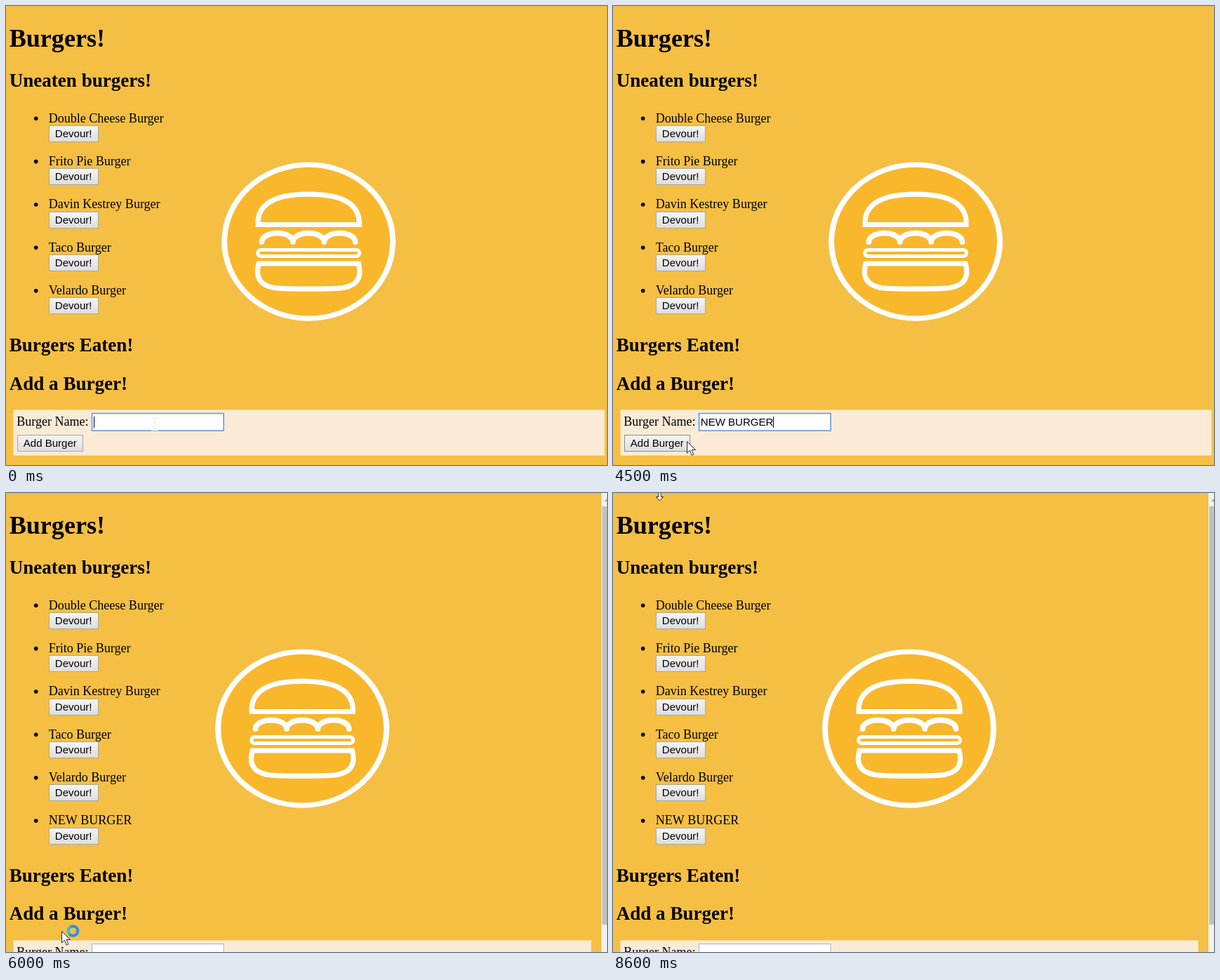
Recreate the animation shown at these times as an HTML page with a canvas. Size 856 by 654 pixels, loop 9100 ms.

```html
<!DOCTYPE html>
<html lang="en">
<head>
<meta charset="utf-8">
<title>Burgers</title>
<style>
html, body { margin: 0; width: 100%; height: 100%; overflow: hidden; background: #f5bf43; }
canvas { display: block; }
</style>
</head>
<body>
<canvas id="stage" width="856" height="654"></canvas>
<script>
const ctx = document.getElementById('stage').getContext('2d', { alpha: false });
const LOOP = 9100, PITCH = 61.35, RELOAD = 5600;
const BODY = 18.05, H1 = BODY * 2, H2 = BODY * 1.5, CONTROL = 15.04;
const SERIF = '"Liberation Serif", "Times New Roman", serif';
const SANS = '"Liberation Sans", Arial, sans-serif';
const BURGERS = ['Double Cheese Burger', 'Frito Pie Burger', 'Davin Kestrey Burger',
  'Taco Burger', 'Velardo Burger', 'NEW BURGER'];

// [time, characters typed]
const TYPING = [[0, 0], [600, 1], [900, 2], [1200, 3], [2000, 4], [2400, 5],
  [2600, 6], [2800, 7], [3000, 8], [3200, 9], [3400, 10]];
const CARET = [[0, 1], [100, 0], [600, 1], [1700, 0], [2000, 1], [3900, 0], [4400, 1], [4800, 0]];
const STATUS = [[0, 0], [5300, 0.5], [5400, 1], [5900, 0.5], [6000, 0]];
// [time, cursor kind, x, y]
const POINTER = [[0, 'beam', 211.5, 596], [4200, 'beam', 198.5, 596],
  [4400, 'arrow', 130, 612], [4500, 'arrow', 105, 620], [4600, 'arrow', 86, 624],
  [4700, 'arrow', 79, 624], [5400, 'busy', 79, 624],
  [6900, 'beam', 81, 611], [7000, 'beam', 84, 576], [7100, 'arrow', 90, 524],
  [7200, 'arrow', 101, 480], [7300, 'arrow', 117, 423],
  [7500, 'arrow', 130, 408], [7600, 'arrow', 140, 393],
  [7800, 'arrow', 132, 290], [7900, 'arrow', 122, 198],
  [8100, 'arrow', 116, 180], [8200, 'beam', 107, 156], [8300, 'beam', 96, 112],
  [8400, 'arrow', 83, 72], [8500, 'arrow', 73, 26], [8600, 'resize', 66.5, 2]];

const at = (keys, t) => keys.filter(k => k[0] <= t).pop();

function rect(x, y, w, h, color) {
  ctx.fillStyle = color;
  ctx.fillRect(x, y, w, h);
}

function text(str, x, y, size, family = SERIF, weight = '', color = '#000') {
  ctx.font = `${weight} ${size}px ${family}`;
  ctx.fillStyle = color;
  ctx.fillText(str, x, y);
}

function ellipse(x, y, rx, ry, color) {
  ctx.beginPath();
  ctx.ellipse(x, y, rx, ry, 0, 0, 7);
  ctx.fillStyle = color;
  ctx.fill();
}

function shape(path, fill, stroke, width) {
  const p = new Path2D(path);
  if (fill) { ctx.fillStyle = fill; ctx.fill(p); }
  if (stroke) { ctx.strokeStyle = stroke; ctx.lineWidth = width; ctx.stroke(p); }
}

function button(label, x, y, w, mouse, pressed) {
  const h = 24;
  const hover = mouse[1] !== 'beam' && mouse[2] >= x && mouse[2] <= x + w &&
    mouse[3] >= y && mouse[3] <= y + h;
  const g = ctx.createLinearGradient(0, y, 0, y + h);
  g.addColorStop(0, pressed ? '#e2e2e2' : '#f5f5f5');
  g.addColorStop(0.35, pressed ? '#e2e2e2' : '#ededed');
  g.addColorStop(1, pressed ? '#cfcfcf' : '#dddddd');
  rect(x, y, w, h, g);
  ctx.strokeStyle = hover ? '#8c8c8c' : '#a9a69f';
  ctx.lineWidth = 1;
  ctx.strokeRect(x + 0.5, y + 0.5, w - 1, h - 1);
  text(label, x + 8.8, y + 16.5, CONTROL, SANS);
}

function icon(dx) {
  ctx.save();
  ctx.translate(dx, 0);
  ellipse(431, 335.6, 124, 113.2, '#fff');
  ellipse(431, 335.6, 116, 105.9, '#f9b72b');
  shape('M359 311.5V306C361 282 382 268.2 431 268.2S501 282 503 306V311.5Z', null, '#fff', 7.2);
  ctx.lineCap = ctx.lineJoin = 'round';
  shape('M364.3 336a22.2 12.4 0 0 1 44.4 0a22.2 12.4 0 0 1 44.4 0a22.2 12.4 0 0 1 44.4 0',
    null, '#fff', 7.8);
  shape('M363 347.5H499a4.5 4.5 0 0 1 0 9H363a4.5 4.5 0 0 1 0-9Z', null, '#fff', 5);
  ctx.lineJoin = 'miter';
  shape('M360 367H502C508 389 499 402.6 465 402.6C442 403.3 420 403.3 397 402.6C363 402.6 354 389 360 367Z',
    null, '#fff', 7.2);
  ctx.restore();
}

function form(dy, right, value, focused, caret, mouse, pressed) {
  rect(10.5, 575.4 + dy, right - 10.5, 65.1, '#faebd7');
  text('Burger Name:', 15.3, 597.5 + dy, BODY);
  rect(122, 580 + dy, 188, 25, '#fff');
  ctx.strokeStyle = focused ? '#5b93e6' : '#b3b0aa';
  ctx.lineWidth = focused ? 1.5 : 1;
  ctx.strokeRect(122.5, 580.5 + dy, 187.5, 24.5);
  text(value, 124.8, 598 + dy, CONTROL, SANS);
  if (caret) rect(Math.round(124.8 + ctx.measureText(value).width), 585, 1, 16, '#000');
  button('Add Burger', 16, 611 + dy, 94, mouse, pressed);
}

function scrollbar() {
  rect(848, 0, 8, 654, '#f1f1f1');
  rect(849, 19, 7, 596, '#c1c1c1');
  shape('M852 12L857 7L862 12Z', '#a3a3a3');
}

function statusBar(alpha) {
  ctx.save();
  ctx.globalAlpha = alpha;
  shape('M0 645H280.5Q284 645 284 648.5V654H0Z', '#000');
  text('Waiting for quiet-meadow-97290 to reply...', 3, 662, 13, SANS, '', '#808080');
  ctx.restore();
}

function pointer([, kind, x, y]) {
  ctx.save();
  ctx.translate(x, y);
  if (kind === 'beam') {
    shape('M-5 -8.5H-1.5L0 -7.5L1.5 -8.5H5M0 -7.5V7.5M-5 8.5H-1.5L0 7.5L1.5 8.5H5',
      null, '#f7f0e4', 1.6);
  } else if (kind === 'resize') {
    shape('M-1.7 -6V3.5H-5L0 9L5 3.5H1.7V-6Z', '#fff', '#222', 1);
  } else {
    if (kind === 'busy') {
      ctx.beginPath();
      ctx.arc(16.5, 0, 6.8, 0, 7);
      ctx.strokeStyle = '#2f8fe0';
      ctx.lineWidth = 4;
      ctx.stroke();
      ctx.beginPath();
      ctx.arc(16.5, 0, 6.8, 2.4, 4.2);
      ctx.strokeStyle = '#45b4f0';
      ctx.stroke();
    }
    shape('M.5 .5V17L4.3 13.3L7.2 20L9.8 18.9L7 12.4H12.4Z', '#fff', '#222', 1);
  }
  ctx.restore();
}

function draw(t) {
  const reloaded = t >= RELOAD;
  const count = reloaded ? 6 : 5;
  const dy = reloaded ? PITCH : 0;
  const mouse = at(POINTER, t);

  rect(0, 0, 856, 654, '#f5bf43');
  icon(reloaded ? -9 : 0);
  text('Burgers!', 4.7, 57.7, H1, SERIF, 'bold');
  text('Uneaten burgers!', 4.7, 114.6, H2, SERIF, 'bold');

  for (let i = 0; i < count; i++) {
    const y = i * PITCH;
    ellipse(42.7, 160.3 + y, 2.8, 2.8, '#000');
    text(BURGERS[i], 60.7, 165.7 + y, BODY);
    button('Devour!', 61, Math.round(170 + y), 71, mouse);
  }

  text('Burgers Eaten!', 4.7, 492.2 + dy, H2, SERIF, 'bold');
  text('Add a Burger!', 4.7, 546.6 + dy, H2, SERIF, 'bold');

  const value = reloaded ? '' : 'NEW BURGER'.slice(0, at(TYPING, t)[1]);
  form(Math.round(dy + 0.4), reloaded ? 833.5 : 852.5, value, t < 4800, at(CARET, t)[1],
    mouse, t >= 4800 && t < 4900);
  if (reloaded) scrollbar();

  const alpha = at(STATUS, t)[1];
  if (alpha) statusBar(alpha);
  pointer(mouse);
}

const start = performance.now();
function tick() {
  draw((performance.now() - start) % LOOP);
  requestAnimationFrame(tick);
}
tick();
</script>
</body>
</html>
```
